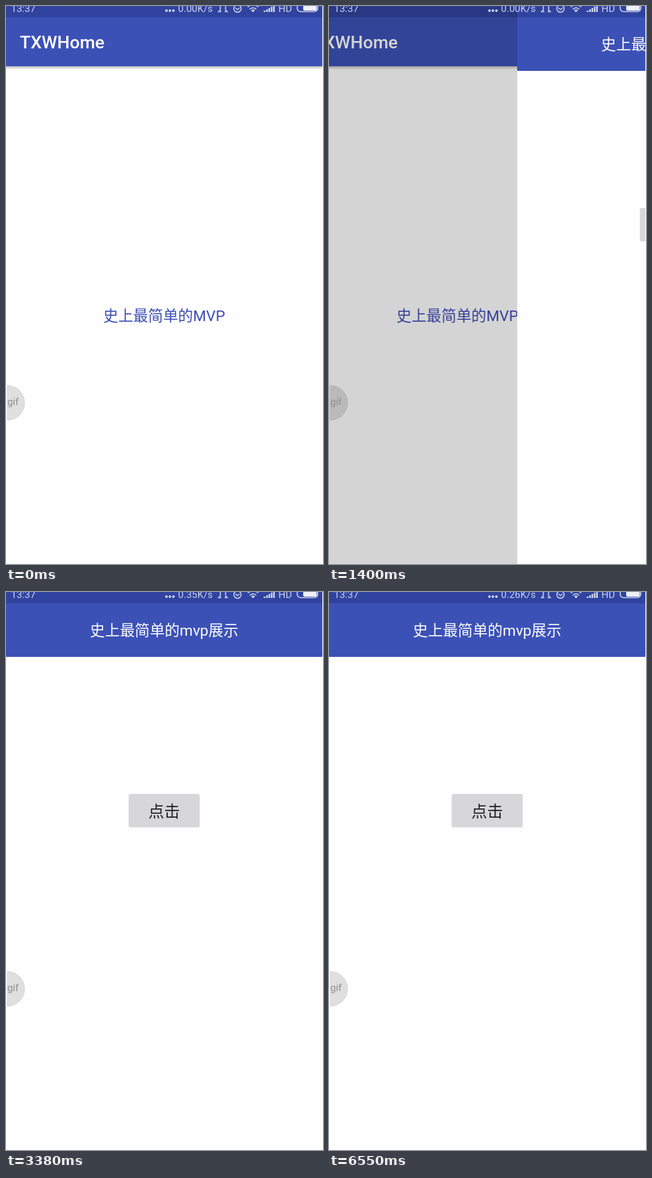
An HTML page that plays this animation: 480 by 843 pixels, repeating every 6780 ms.

```html
<!DOCTYPE html>
<html lang="zh-CN">
<head>
<meta charset="utf-8">
<title>Page transition and toast</title>
<style>
  html, body { margin: 0; width: 100%; height: 100%; overflow: hidden; background: #fff; }
  svg { display: block; width: 100%; height: 100%; }
  text { font-family: Roboto, "Noto Sans CJK SC", "Noto Sans CJK", sans-serif; }
  .bar { fill: #3c51b6; }
  .status { fill: #30439f; }
  .line { fill: none; stroke: #ccd1ec; stroke-width: 1.6; }
</style>
</head>
<body>
<svg viewBox="0 0 480 843" preserveAspectRatio="none">
  <defs>
    <linearGradient id="shade" x2="0" y2="1">
      <stop stop-opacity=".26"/>
      <stop offset="1" stop-opacity="0"/>
    </linearGradient>
  </defs>

  <rect width="480" height="843" fill="#fefefe"/>
  <rect class="bar" width="480" height="91"/>
  <rect class="status" width="480" height="17"/>
  <rect y="91" width="480" height="5" fill="url(#shade)"/>
  <g id="home">
    <text x="21" y="64" font-size="26.67" font-weight="500" fill="#fff">TXWHome</text>
    <text x="239.5" y="476" font-size="22.67" text-anchor="middle" fill="#3c4db4">史上最简单的MVP</text>
  </g>
  <rect id="dim" width="480" height="843"/>

  <g id="detail">
    <rect width="480" height="843" fill="#fefefe"/>
    <rect class="bar" width="480" height="98"/>
    <rect class="status" width="480" height="17"/>
    <text x="239.5" y="66" font-size="22.67" text-anchor="middle" fill="#fff">史上最简单的mvp展示</text>
    <rect x="185.5" y="306" width="108" height="50" rx="3" fill="#000" opacity=".1"/>
    <rect x="186" y="305" width="107" height="50" rx="2.5" fill="#d7d7d9"/>
    <text x="239.5" y="339.5" font-size="24" text-anchor="middle" fill="#202020">点击</text>
  </g>

  <g id="badge">
    <path id="disc" d="M2 573.3A26.2 26.2 0 0 1 2 625.7Z" fill="#000" fill-opacity=".12" stroke="#000" stroke-opacity=".1"/>
    <text id="label" x="2" y="602.5" font-size="15" fill="#8e8e8e">gif</text>
  </g>

  <g id="toast">
    <rect x="147" y="700" width="184" height="58" rx="12" fill="#666167"/>
    <text x="239.5" y="735.5" font-size="16" text-anchor="middle" fill="#f4f4f4"
      style="font-family: Inter, 'Noto Sans CJK SC', 'Noto Sans CJK', sans-serif; font-weight: 300">MVP模式调用成功了</text>
  </g>

  <g fill="#ccd1ec" font-size="15">
    <text x="7.5" y="9">13:37</text>
    <circle cx="243" cy="7" r="2"/>
    <circle cx="248.2" cy="7" r="2"/>
    <circle cx="253.5" cy="7" r="2"/>
    <text id="speed" x="260.5" y="9"></text>
    <path class="line" d="M324.5 -1V6L322 8.5H326M332.5 -1V6L335 8.5H331"/>
    <circle class="line" cx="350.5" cy="4" r="5.5"/>
    <path class="line" d="M347.5 3L350.5 5.5L353.5 3M366 1.5Q374 -5 382 1.5M369 5Q374 .5 379 5"/>
    <path d="M371 6.5Q374 4 377 6.5L374 9.5Z"/>
    <path d="M390 9V7H393V9ZM394 9V5H396.5V9ZM397.5 9V3H400V9ZM401 9V1H403.5V9ZM404.5 9V-2H407V9Z"/>
    <text x="412.5" y="9">HD</text>
    <rect class="line" x="441" y="-4" width="31" height="12.5" rx="5"/>
    <rect x="450" y="-4" width="20.5" height="11" rx="2" fill="#eef0fa"/>
  </g>
  <rect x="479" width="1" height="843" fill="#fff"/>
</svg>
<script>
const LOOP = 6780;
const SLIDE_STEPS = [1360, 1400, 1500, 1590];
const el = id => document.getElementById(id);
const set = (id, name, value) => el(id).setAttribute(name, value);
const clamp = v => Math.max(0, Math.min(1, v));
const stepped = (t, start, size) => start + Math.floor((t - start) / size) * size;

// The page slides on a decelerating curve, sampled at uneven steps.
function slideProgress(t) {
  const step = SLIDE_STEPS.filter(s => s <= t).pop();
  return step ? 1 - (1 - clamp((step - 1344.8) / 240)) ** 2 : 0;
}

function drawToast(t) {
  const entering = stepped(t, 3380, 100);
  const leaving = stepped(t, 5550, 100);
  const opacity = t < 5550
    ? clamp((entering - 3380) / 600)
    : clamp(1 - (leaving - 5550) / 620);
  const drop = 36 * clamp((3980 - entering) / 500) ** 2;
  set("toast", "opacity", t < 6260 ? opacity : 0);
  set("toast", "transform", `translate(0 ${drop})`);
}

function draw(t) {
  const p = slideProgress(t);
  const almostThere = p > .8 && p < 1;
  set("home", "transform", `translate(${-Math.round(110 * p)} 0)`);
  set("dim", "opacity", .4 * p);
  set("detail", "transform", `translate(${Math.round(480 * (1 - p))} 0)`);
  set("disc", "stroke", almostThere ? "#fff" : "#000");
  set("disc", "stroke-opacity", almostThere ? .35 : .1);
  set("label", "opacity", almostThere ? 0 : 1);
  el("speed").textContent = t < 2090 ? "0.00K/s" : t < 6550 ? "0.35K/s" : "0.26K/s";
  drawToast(t);
}

const start = performance.now();
function tick() {
  draw((performance.now() - start) % LOOP);
  requestAnimationFrame(tick);
}
tick();
</script>
</body>
</html>
```
